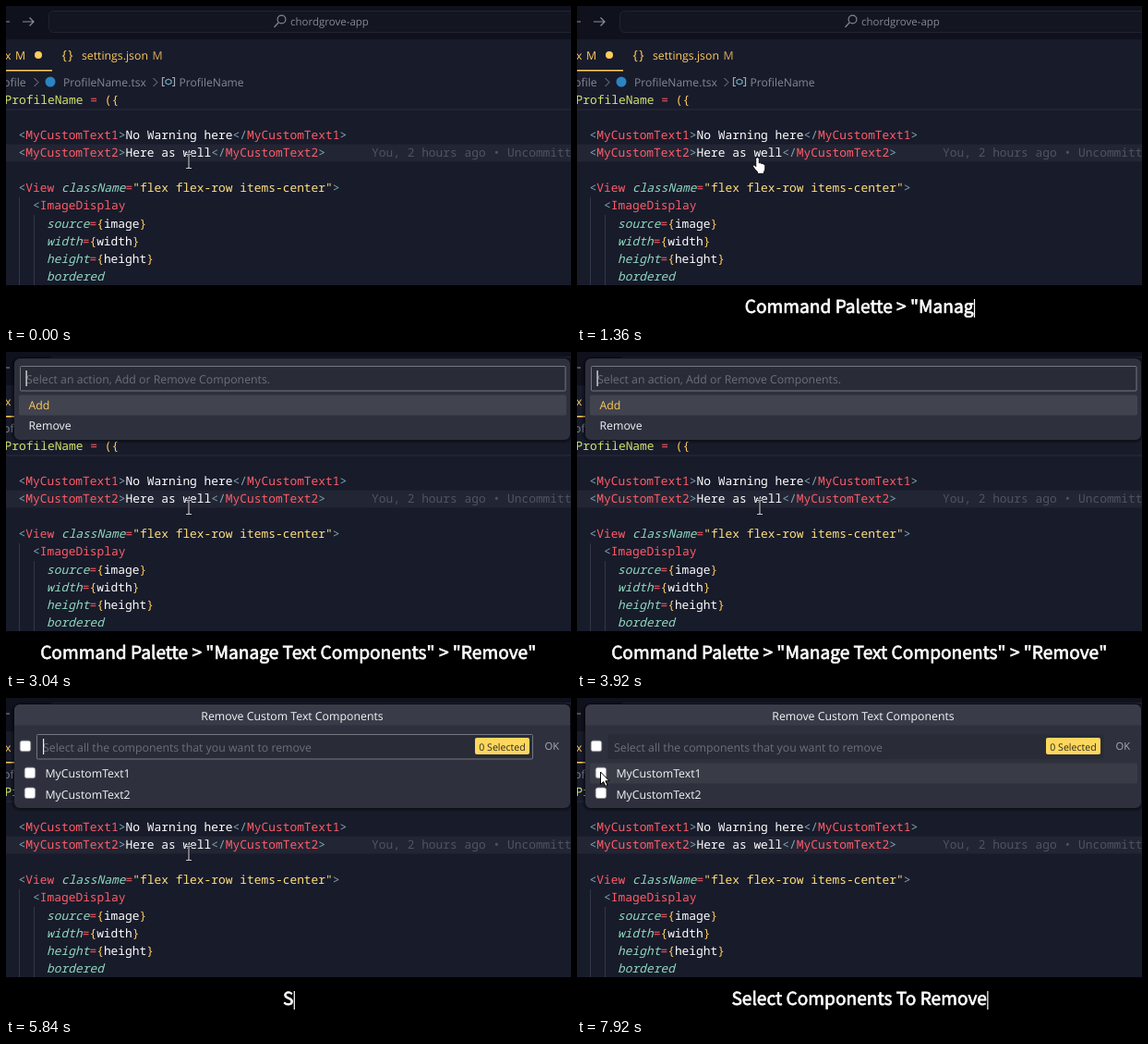
An HTML page for the animation above (8 s loop, 612 px wide and 344 px high).

```html
<!DOCTYPE html>
<html lang="en">
<head>
<meta charset="utf-8">
<title>Custom text components</title>
<style>
html, body { margin: 0; width: 100%; height: 100%; overflow: hidden; background: #000; }
svg { display: block; width: 612px; height: 344px; }
text { white-space: pre; text-rendering: geometricPrecision; }
.ui { font: 500 12.3px "Open Sans", "Noto Sans", sans-serif; }
.code { font: 500 12.9px "Noto Sans Mono", "DejaVu Sans Mono", monospace; }
.cap { font: 500 19.15px "Noto Sans CJK JP", "Noto Sans CJK SC", "Noto Sans", sans-serif; fill: #fff; stroke: #fff; stroke-width: .7px; }
</style>
</head>
<body>
<svg id="stage" viewBox="0 0 612 344"></svg>
<script>
const LOOP = 8000;
const C = {
  edit: '#181b2a', line: '#222534', panel: '#2e313d', row: '#41434e', hover: '#393c47',
  text: '#f2f3f5', grey: '#858894', dim: '#6c6f7a', gold: '#ffcb5c', red: '#ff5c68', mint: '#8fd8c0',
  str: '#ffe07c', white: '#ffffff', punct: '#7fa6b4', lime: '#d3e36e'
};

const NS = 'http://www.w3.org/2000/svg';
const stage = document.getElementById('stage');
function add(parent, tag, attrs = {}, content) {
  const el = document.createElementNS(NS, tag);
  for (const k in attrs) el.setAttribute(k, attrs[k]);
  if (content !== undefined) el.textContent = content;
  return parent.appendChild(el);
}
const group = (parent = stage) => add(parent, 'g');
const rect = (p, x, y, width, height, fill, more) => add(p, 'rect', { x, y, width, height, fill, ...more });
const path = (p, d, stroke, more) => add(p, 'path', { d, stroke, fill: 'none', ...more });
const label = (p, x, y, s, fill = C.text, more) => add(p, 'text', { class: 'ui', x, y, fill, ...more }, s);
const show = (el, on) => el.setAttribute('visibility', on ? 'inherit' : 'hidden');

// Alternating text and colour
function code(x, y, ...parts) {
  const t = add(stage, 'text', { class: 'code', x, y });
  for (let i = 0; i < parts.length; i += 2) {
    const a = { fill: parts[i + 1] };
    if (parts[i + 1] === C.mint) a['font-style'] = 'italic';
    add(t, 'tspan', a, parts[i]);
  }
}

function gear(p, x, y, stroke) {
  add(p, 'circle', { cx: x, cy: y, r: 5, fill: 'none', stroke, 'stroke-width': 1.1 });
  add(p, 'circle', { cx: x, cy: y, r: 6.2, fill: 'none', stroke, 'stroke-width': 1.7, 'stroke-dasharray': '2.1 2.77' });
  add(p, 'circle', { cx: x, cy: y, r: 1.9, fill: 'none', stroke, 'stroke-width': 1.1 });
}

function drawEditor() {
  rect(stage, 0, 0, 612, 344, C.edit);
  rect(stage, 0, 0, 612, 36, '#0f111c');
  rect(stage, 46.5, 5.5, 600, 23, '#131520', { rx: 5, stroke: '#212431' });
  path(stage, 'M-8 17H4M18 17H30M25.5 12.5L30 17L25.5 21.5', '#8b8e99', { 'stroke-width': 1.2 });
  path(stage, 'M290.5 23L295 18', '#858894', { 'stroke-width': 1.2 });
  add(stage, 'circle', { cx: 298.5, cy: 14.5, r: 4.4, fill: 'none', stroke: '#858894', 'stroke-width': 1.2 });
  label(stage, 308, 21, 'chordgrove-app', '#858894', { style: 'font-size:11.5px' });

  rect(stage, 0, 69, 50, 1.5, C.gold);
  label(stage, -1, 57.5, 'x', C.gold);
  label(stage, 10, 57.5, 'M', C.gold);
  add(stage, 'circle', { cx: 35, cy: 53, r: 4, fill: C.gold });
  label(stage, 60.5, 57.5, '{}', C.gold, { style: 'font-size:14px;letter-spacing:1.5px' });
  label(stage, 82, 57.5, 'settings.json', C.gold);
  label(stage, 158.5, 57.5, 'M', '#d6ab56');

  label(stage, -3, 87, 'ofile', C.grey);
  for (const x of [30.5, 159.5]) path(stage, `M${x} 78l4.5 4.5l-4.5 4.5`, C.grey);
  add(stage, 'circle', { cx: 48, cy: 82, r: 5.5, fill: '#2b84c4' });
  label(stage, 62, 87, 'ProfileName.tsx', C.grey, { style: 'font-size:12.1px' });
  path(stage, 'M172 77.5h-2.5v9h2.5M180 77.5h2.5v9h-2.5', '#a5a8b2', { 'stroke-width': 1.2 });
  path(stage, 'M173 80.5l3-1.5l3 1.5v3l-3 1.5l-3-1.5z', '#74b9cf', { 'stroke-width': 1.1 });
  label(stage, 187.5, 87, 'ProfileName', C.grey, { style: 'font-size:12.1px' });

  code(-1.5, 106, 'ProfileName', C.lime, ' = ', C.red, '({', C.gold);
  rect(stage, 0, 111.5, 612, 1, '#2a2d3b');
  rect(stage, 0, 149.5, 612, 19, C.line);
  path(stage, 'M14.5 207V302M30.5 226V302', '#323645');

  const lineY = n => 144 + n * 19.12;
  const tag = (n, name, body) => code(13.5, lineY(n), '<', C.punct, name, C.red, '>', C.punct, body, C.white,
    '</', C.punct, name, C.red, '>', C.punct);
  tag(0, 'MyCustomText1', 'No Warning here');
  tag(1, 'MyCustomText2', 'Here as well');
  code(396, lineY(1), 'You, 2 hours ago • Uncommitted changes', '#505361');
  code(13.5, lineY(3), '<', C.punct, 'View', C.red, ' className', C.mint, '=', C.red,
    '"flex flex-row items-center"', C.str, '>', C.punct);
  code(29, lineY(4), '<', C.punct, 'ImageDisplay', C.red);
  ['source image', 'width width', 'height height'].forEach((s, i) => {
    const [attr, value] = s.split(' ');
    code(44, lineY(5 + i), attr, C.mint, '=', C.red, '{', C.gold, value, C.white, '}', C.gold);
  });
  code(44, lineY(8), 'bordered', C.mint);
}

function panel(height) {
  const g = group();
  for (let i = 4; i > 0; i--)
    rect(g, 9 - i, 7 - i / 2, 602 + 2 * i, height + 1.5 * i, '#000', { rx: 6 + i, opacity: .12 });
  rect(g, 9, 7, 602, height, C.panel, { rx: 6 });
  return g;
}
const input = (g, x, y, w) => rect(g, x, y, w, 26.5, '#292c37', { stroke: '#74777f', rx: 1 });
const rowY = i => 46.5 + i * 22.15;
const rowBar = (g, y, fill) => rect(g, 14, y, 593, 22, fill, { rx: 2 });
const caretAt = (g, x, y) => rect(g, x, y, 1.2, 17, '#f0f0f0');

function drawPalette() {
  const g = panel(310);
  input(g, 15.5, 15.5, 590.5);
  label(g, 22, 33.5, '>');
  rowBar(g, rowY(0), C.row);
  rowBar(g, rowY(5), C.hover);
  rect(g, 602, 47, 5, 20, '#565963');
  [
    'RN Text Watcher: Manage Custom Text Components',
    'RN Text Watcher: Change Severity Type (Warning/Error/Info/Hint)',
    'Preferences: Open User Settings (JSON)',
    'Developer: Inspect Editor Tokens and Scopes',
    'Markdown Preview Enhanced: Create TOC',
    'TypeScript: Restart TS Server',
    'Developer: Reload Window',
    'Paste JSON as Code',
    'Prettier: Create Configuration File',
    'Python: Clear Workspace Interpreter Setting',
    'Preferences: Open Default Settings (JSON)',
    'Todo Tree: Refresh'
  ].forEach((s, i) => label(g, 24.5, rowY(i) + 15.5, s, i ? C.text : C.gold));
  label(g, 568, rowY(0) + 15.5, 'recently used', C.gold, { 'text-anchor': 'end' });
  gear(g, 582, 57.5, C.gold);
  gear(g, 582, 167.5, '#7c7f89');
  for (const [x, w, s] of [[481, 29, 'Ctrl'], [525, 31, 'Shift'], [570, 18, 'V']]) {
    rect(g, x, 203, w, 17, '#454853', { rx: 3, stroke: '#50535e' });
    label(g, x + w / 2, 216, s, '#c4c6cc', { 'text-anchor': 'middle', style: 'font-size:11px' });
  }
  for (const x of [516.5, 563]) label(g, x, 216.5, '+', C.text, { 'text-anchor': 'middle', style: 'font-size:11.5px' });
  return { g, caret: caretAt(g, 29.5, 20) };
}

function drawActions() {
  const g = panel(88);
  input(g, 15.5, 15.5, 590.5);
  label(g, 22, 34, 'Select an action, Add or Remove Components.', C.dim);
  const bar = rowBar(g, rowY(0), C.row);
  const items = ['Add', 'Remove'].map((s, i) => label(g, 24.5, rowY(i) + 15.5, s));
  const pick = n => {
    bar.setAttribute('y', rowY(n));
    items.forEach((el, i) => el.setAttribute('fill', i === n ? C.gold : C.text));
  };
  return { g, pick, caret: caretAt(g, 21.5, 20) };
}

function drawRemove() {
  const g = panel(112);
  path(g, 'M9 29.5V13a6 6 0 0 1 6-6H605a6 6 0 0 1 6 6V29.5z', 'none', { style: 'fill:#393c48' });
  label(g, 310, 23.5, 'Remove Custom Text Components', C.text, { 'text-anchor': 'middle' });
  const box = input(g, 33.5, 39.5, 537);
  label(g, 40, 57.5, 'Select all the components that you want to remove', C.dim);
  rect(g, 508, 43, 59, 18, '#ffd75e', { rx: 2 });
  label(g, 537.5, 56.5, '0 Selected', '#2b2a24', { 'text-anchor': 'middle', style: 'font-size:10.6px' });
  label(g, 583.5, 56, 'OK', '#a9acb5', { style: 'font-size:11.2px' });
  const bar = rowBar(g, 70.5, C.hover);
  const check = (x, y) => rect(g, x, y, 11.5, 11.5, '#fff', { rx: 2.5, stroke: '#8b8d94', 'stroke-width': .8 });
  check(15.2, 46.2);
  check(20.2, 75.2);
  check(20.2, 97);
  label(g, 42.5, 86, 'MyCustomText1');
  label(g, 42.5, 108.5, 'MyCustomText2');
  return { g, box, bar, caret: caretAt(g, 40, 44) };
}

function drawPointers() {
  const beam = group(), hand = group(), arrow = group();
  const beamPath = 'M-3 -7.5H-1Q0 -7.5 0 -6.5Q0 -7.5 1 -7.5H3M0 -6.5V6.5M-3 7.5H-1Q0 7.5 0 6.5Q0 7.5 1 7.5H3';
  path(beam, beamPath, '#11131c', { 'stroke-width': 2.4 });
  path(beam, beamPath, '#c9cbd0', { 'stroke-width': 1.1 });
  const solid = (g, d) => path(g, d, '#000', { style: 'fill:#fff', 'stroke-width': 1, 'stroke-linejoin': 'round' });
  solid(hand, 'M-2 2a2 2 0 0 1 4 0V7q2-.8 2.6.6q2-.6 2.6.9q2.2-.4 2.2 1.6V14q0 2-1.5 4V20H0V18q-3-3-5.5-6.5q-.8-2 1.2-2q1 0 2.3 1.8z');
  hand.firstChild.setAttribute('transform', 'scale(.88)');
  solid(arrow, 'M0 0V13.5L3.2 10.6L5.4 15.4L7.6 14.4L5.4 9.8H9.6z');
  return { beam, hand, arrow };
}

drawEditor();
const palette = drawPalette(), actions = drawActions(), remove = drawRemove();
const pointers = drawPointers();
rect(stage, 0, 302, 612, 42, '#000');
const caption = add(stage, 'text', { class: 'cap', x: 305.7, y: 332, 'text-anchor': 'middle' });
const captionCaret = rect(stage, 0, 317, 1.2, 20, '#fff');

const FIRST = 'Command Palette > "Manage Text Components" > "Remove"';
const SECOND = 'Select Components To Remove';
const OPEN = { palette: 1440, actions: 2800, remove: 4480 };

const steps = (t, from, each) => Math.max(0, Math.floor((t - from) / each));
const ramp = (t, a, b) => Math.min(1, Math.max(0, (t - a) / (b - a)));
const ease = k => k * k * (3 - 2 * k);
const blink = (t, from) => (t - from) % 1060 < 530;

function captionText(t) {
  if (t < 4060) return FIRST.slice(0, steps(t, 150, 50));
  if (t < 5770) return FIRST.slice(0, Math.max(0, FIRST.length - steps(t, 4060, 30)));
  return SECOND.slice(0, steps(t, 5770, 50));
}

function pointerAt(t) {
  if (t < 1360) return ['beam', 198, 168];
  if (t < OPEN.actions) {
    const k = ramp(t, 1360, 1700);
    return ['hand', 195.5 + 1.5 * k, 163.7 + 5 * k];
  }
  const k = ease(ramp(t, 6300, 7400));
  const x = 198 - 172.5 * k, y = 168 - 88 * k;
  return [y > 119 ? 'beam' : x > 36 ? 'hand' : 'arrow', x, y];
}

function render(t) {
  const inPalette = t >= OPEN.palette && t < OPEN.actions;
  const inActions = t >= OPEN.actions && t < OPEN.remove;
  const inRemove = t >= OPEN.remove;
  show(palette.g, inPalette);
  show(actions.g, inActions);
  show(remove.g, inRemove);

  const [kind, x, y] = pointerAt(t);
  for (const k in pointers) show(pointers[k], k === kind);
  pointers[kind].setAttribute('transform', `translate(${x} ${y})`);

  show(palette.caret, blink(t, 1040));
  show(actions.caret, blink(t, OPEN.actions));
  actions.pick(t < 4160 ? 0 : 1);

  const focused = t < 7760;
  show(remove.caret, focused && blink(t, OPEN.remove));
  remove.box.setAttribute('stroke', focused ? '#74777f' : 'none');
  show(remove.bar, y > 70 && y < 115);
  remove.bar.setAttribute('y', y < 92.5 ? 70.5 : 92.7);

  const s = captionText(t);
  if (caption.textContent !== s) caption.textContent = s;
  const w = s ? caption.getComputedTextLength() : 0;
  captionCaret.setAttribute('x', 305.7 + w / 2 + .3);
  const phase = t % 920;
  show(captionCaret, phase >= 300 && phase < 760);
}

// Hidden carets must not show through a closed panel
for (const p of [palette, actions, remove]) p.g.style.display = 'inline';
const start = performance.now();
function tick() {
  render((performance.now() - start) % LOOP);
  for (const p of [palette, actions, remove])
    p.g.style.display = p.g.getAttribute('visibility') === 'hidden' ? 'none' : 'inline';
  requestAnimationFrame(tick);
}
tick();
</script>
</body>
</html>
```
